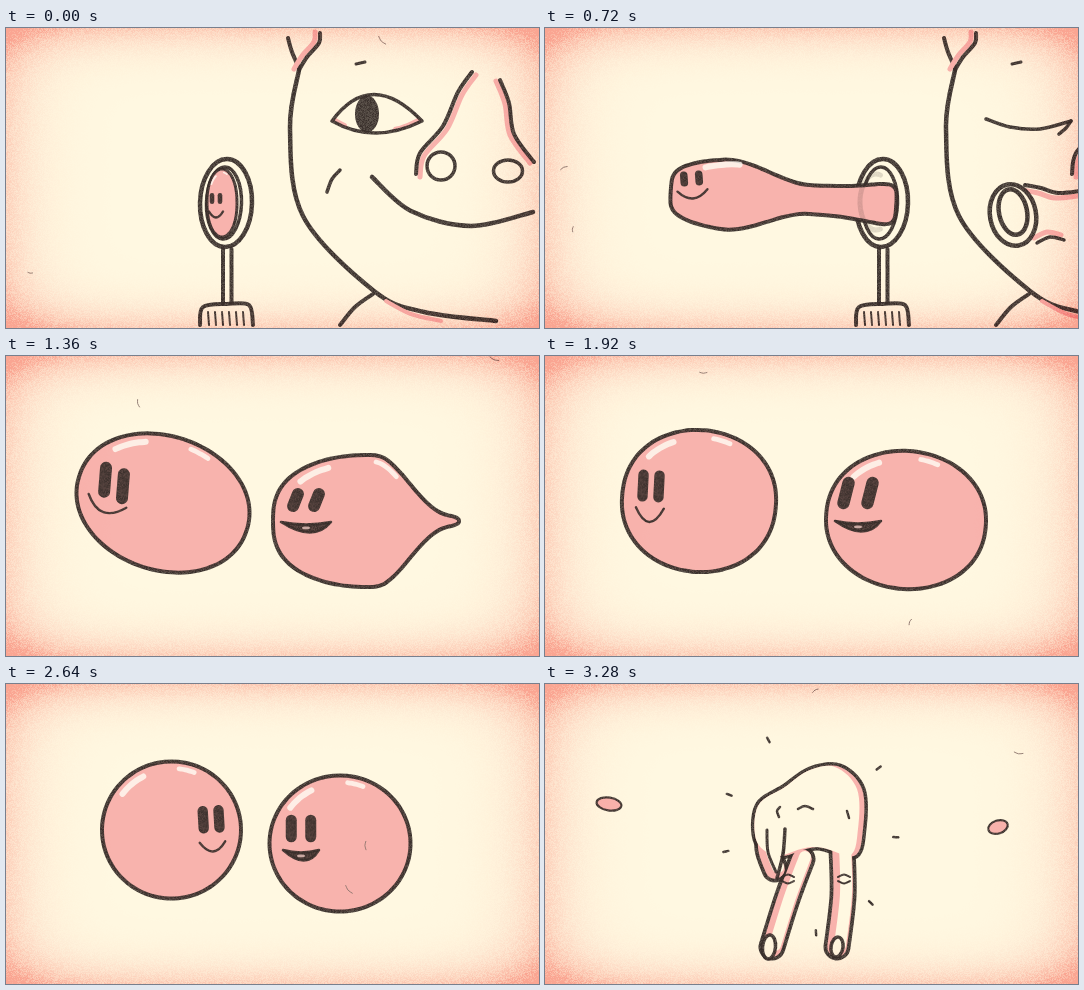
An HTML page with a canvas that plays this animation: 533x300 px, repeating every 3.36 s.

```html
<!DOCTYPE html>
<html lang="en">
<head>
<meta charset="utf-8">
<title>Bubbles</title>
<style>
  html, body { margin: 0; width: 100%; height: 100%; overflow: hidden; background: #fff8e1; }
  canvas { position: fixed; left: 0; top: 0; width: 100vw; height: 100vh; display: block; }
  #paper { mix-blend-mode: multiply; }
</style>
</head>
<body>
<canvas id="art" width="533" height="300"></canvas>
<canvas id="paper" width="533" height="300"></canvas>
<script>
const W = 533, H = 300, LOOP = 3360, STEP = 80;
const CREAM = '#fff8e1', PINK = '#f8b3ad', WHITE = '#fffdf4';
const c = document.getElementById('art').getContext('2d');

function random(seed) {
  return () => {
    seed = (seed * 1664525 + 1013904223) >>> 0;
    return seed / 4294967296;
  };
}

function paintPixels(ctx, w, h, pixel) {
  const img = ctx.createImageData(w, h);
  for (let y = 0, i = 0; y < h; y++)
    for (let x = 0; x < w; x++, i += 4) img.data.set(pixel(x, y), i);
  ctx.putImageData(img, 0, 0);
}

// Grainy crayon for all outlines
function makeInk() {
  const tile = document.createElement('canvas'), rnd = random(3);
  tile.width = tile.height = 96;
  paintPixels(tile.getContext('2d'), 96, 96, () => [56, 46, 42, 205 + 50 * rnd()]);
  return c.createPattern(tile, 'repeat');
}
const INK = makeInk();

// Pink sprayed edges over the whole stage
function paintPaper() {
  const rnd = random(7);
  paintPixels(document.getElementById('paper').getContext('2d'), W, H, (x, y) => {
    const u = Math.abs(x / W * 2 - 1), v = Math.abs(y / H * 2 - 1);
    const a = .42 * u ** 9 + .5 * v ** 8 + .5 * (u * v) ** 5;
    return [250, 170, 165, Math.min(1, a * (.7 + .6 * rnd())) * 255];
  });
}

const clamp = v => Math.max(0, Math.min(1, v));
const smooth = (a, b, v) => {
  v = clamp((v - a) / (b - a));
  return v * v * (3 - 2 * v);
};

// Smooth curve through a flat list of points
function trace(p, closed) {
  const n = p.length / 2;
  const pt = i => {
    i = closed ? (i + n) % n : Math.max(0, Math.min(n - 1, i));
    return [p[i * 2], p[i * 2 + 1]];
  };
  c.beginPath();
  c.moveTo(p[0], p[1]);
  for (let i = 0; i < (closed ? n : n - 1); i++) {
    const [a, b, d, e] = [pt(i - 1), pt(i), pt(i + 1), pt(i + 2)];
    c.bezierCurveTo(b[0] + (d[0] - a[0]) / 6, b[1] + (d[1] - a[1]) / 6,
      d[0] - (e[0] - b[0]) / 6, d[1] - (e[1] - b[1]) / 6, d[0], d[1]);
  }
  if (closed) c.closePath();
}
function ink(width = 4, color = INK) {
  c.lineWidth = width;
  c.strokeStyle = color;
  c.stroke();
}
function tint(color) {
  c.fillStyle = color;
  c.fill();
}
function line(p, width, color) {
  trace(p);
  ink(width, color);
}
function oval(x, y, rx, ry, rot, fill, width) {
  c.beginPath();
  c.ellipse(x, y, rx, ry, rot, 0, Math.PI * 2);
  if (fill) tint(fill);
  if (width) ink(width);
}
function at(x, y, turn, paint, size = 1) {
  c.save();
  c.translate(x, y);
  c.rotate(turn);
  c.scale(size, size);
  paint();
  c.restore();
}
// Line with a pink shadow on one side
function shaded(p, dx, dy, width = 4) {
  line(p.map((v, i) => v + (i % 2 ? dy : dx)), 5, PINK);
  line(p, width);
}

// Pose of a track of [time, pose] at t
function pose(track, t) {
  let i = 0;
  while (i < track.length - 2 && t >= track[i + 1][0]) i++;
  const [t0, a] = track[i], [t1, b] = track[i + 1], f = smooth(t0, t1, t), out = {};
  for (const k in a) out[k] = a[k] + (b[k] - a[k]) * f;
  return out;
}

// Bubble film: an ellipse that can be boxed, pinched to a neck, flared and notched
const body = (x, y, rx, ry, more) =>
  ({ x, y, rx, ry, tilt: 0, box: 1, pinch: 0, from: .5, flare: 0, notch: 0, ...more });
const disc = x => body(x, 175, 15, 34, { box: .9, from: .25 });
const blown = x => body(x, 170, 113, 38,
  { tilt: .06, box: .5, pinch: .63, from: .22, flare: .65 });
const tailed = (x, y, rx, ry) => body(x, y, rx, ry, { box: .75, pinch: .85, from: .55 });

function rim(b, a, scale = 1) {
  const u = Math.cos(a), v = Math.sin(a), p = (1 + u) / 2;
  const w = 1 - b.pinch * smooth(b.from, b.from + .4, p) + b.flare * p ** 8
    - b.notch * Math.exp(-(((p - .46) / .09) ** 2));
  const x = b.rx * u * scale, y = b.ry * w * Math.sign(v) * Math.abs(v) ** b.box * scale;
  const cos = Math.cos(b.tilt), sin = Math.sin(b.tilt);
  return [b.x + x * cos - y * sin, b.y + x * sin + y * cos];
}
function arc(b, from, to, scale, n = 6) {
  return Array.from({ length: n }, (_, i) => rim(b, from + (to - from) * i / (n - 1), scale)).flat();
}
function bubble(b) {
  trace(arc(b, 0, Math.PI * 2 * 63 / 64, 1, 64), true);
  tint(PINK);
  ink(b.rx < 30 ? 3 : 4);
  const w = Math.min(6, b.rx / 8);
  c.globalAlpha = .8;
  line(arc(b, -2.5, -2.05, .88), w, WHITE);
  if (!b.flare) line(arc(b, -1.45, -1.2, .9), w * .8, WHITE);
  c.globalAlpha = 1;
}

// Face: eyes around x, y; the mouth hangs below
const face = (x, y, gap, rx, ry, drop, wide, deep, more) =>
  ({ x, y, gap, rx, ry, drop, wide, deep, turn: 0, lean: 0, bow: 0, ...more });
const tiny = x => face(x, 170.5, 8, 2.3, 5.5, 13, 7, 6);
const puffed = x => face(x, 150.5, 15, 3.8, 7.5, 12, 15, 8, { turn: -.08 });

function drawFace(f, open) {
  at(f.x, f.y, f.turn, () => {
    for (const side of [-.5, .5]) at(side * f.gap, 0, f.lean, () => {
      const h = f.ry - f.rx;
      line([0, -h, f.bow, 0, 0, h], f.rx * 2);
    });
    c.beginPath();
    c.moveTo(-f.wide, f.drop);
    c.quadraticCurveTo(0, f.drop + (open ? 5 : f.deep * 2), f.wide, f.drop);
    if (!open) return ink(2.4);
    c.quadraticCurveTo(f.wide * .3, f.drop + f.deep * 3, -f.wide, f.drop);
    tint(INK);
    ink(2.5);
    oval(0, f.drop + f.deep * .85, 4, 1.4, 0, '#c9a9a2');
  });
}

const pan = t => 117 * (t / 720) ** 2;

const left = {
  body: [
    [0, disc(216)],
    [240, disc(216 + pan(240))],
    [720, blown(238.5)],
    [960, tailed(175, 158, 96, 58)],
    [1360, body(157, 147, 88, 67, { tilt: .32, box: .95 })],
    [1920, body(154, 145, 77, 71, { box: .9, tilt: .1 })],
    [2320, body(153, 146, 76, 70)],
    [2520, body(153, 146, 75, 71)],
    [2760, body(178, 146, 64, 66)]
  ],
  face: [
    [0, tiny(210)],
    [240, tiny(210 + pan(240))],
    [720, puffed(146.5)],
    [1360, face(108, 127, 19, 6, 18, 19, 20, 12, { turn: .35, lean: -.27 })],
    [1920, face(106, 130, 16, 5.2, 16, 22, 14, 14, { turn: .05 })],
    [2160, face(106, 136, 17, 5.5, 18, 24, 14, 12, { turn: -.1 })],
    [2320, face(130, 184, 18, 6, 30, 40, 9, 8, { turn: -1.05, bow: -5 })],
    [2480, face(196, 142, 17, 5.5, 15, 24, 14, 10, { turn: -.15 })],
    [2760, face(211, 131, 15, 5, 13, 22, 12, 9)]
  ]
};
const right = {
  body: [
    [880, disc(216 + pan(880))],
    [1120, blown(121.5 + pan(1120))],
    [1360, tailed(360, 165, 93, 66)],
    [1600, body(358, 165, 76, 69)],
    [1920, body(361, 164, 80, 69, { box: .92, tilt: .1 })],
    [2320, body(360, 162, 74, 73)],
    [2520, body(360, 162, 73, 72)],
    [2760, body(308, 157, 68, 64)]
  ],
  face: [
    [880, tiny(210 + pan(880))],
    [1120, puffed(29.5 + pan(1120))],
    [1360, face(300, 144, 21, 6, 12.5, 22, 25, 7, { lean: .38 })],
    [1920, face(313, 137, 24, 6.2, 16.5, 28, 23, 7, { lean: .25 })],
    [2320, face(319.5, 150, 21, 6, 14.5, 21, 20, 7)],
    [2520, face(318, 150, 21, 6, 14.5, 21, 20, 7)],
    [2760, face(272, 139, 18, 5, 13, 22, 16, 7)]
  ]
};
const joined = [
  [2760, body(244, 152, 132, 65, { tilt: .08, box: .6, notch: .42 })],
  [2960, body(250, 150, 132, 63, { tilt: .09, box: .56, notch: .06 })],
  [3160, body(264, 150, 80, 82)]
];

function wand() {
  oval(220, 175, 26, 44, .03, CREAM, 4.5);
  oval(218, 175, 17.5, 36, .03, null, 3.5);
  for (const x of [217, 225.5]) line([x, 221, x, 275]);
  line([194, 297, 197, 279, 221, 276, 243, 277, 247, 297]);
  for (let x = 202; x < 244; x += 7) line([x, 284, x + 1, 297], 2);
}

function openEye() {
  c.beginPath();
  c.moveTo(326, 93);
  c.quadraticCurveTo(365, 40, 416, 93);
  c.quadraticCurveTo(368, 117, 326, 93);
  c.save();
  c.clip();
  line([326, 93, 344, 102, 368, 105, 395, 102, 416, 93], 9, PINK);
  oval(365, 88, 26, 24, 0, CREAM);
  c.restore();
  c.beginPath();
  c.moveTo(326, 93);
  c.quadraticCurveTo(365, 40, 416, 93);
  c.quadraticCurveTo(368, 117, 326, 93);
  ink(3.5);
  oval(361, 86, 12, 18.5, 0, INK);
}

function pucker() {
  shaded([12, -30, 28, -27, 45, -22, 68, -24], -3, 5);
  shaded([24, 28, 37, 22, 51, 25], -3, -5, 3.5);
  oval(0, 0, 23, 31, -.18, CREAM, 4.5);
  oval(0, -3, 14, 23, -.2, CREAM, 4.5);
}

function person(t) {
  // Ear, cheek, chin, neck
  line([282, 10, 286, 24, 293, 40]);
  shaded([314, 5, 313, 15, 301, 29, 293, 42], -5, -1);
  line([293, 42, 284, 100, 297, 188, 368, 263, 418, 284, 490, 293], 4.5);
  line([380, 273, 405, 286, 435, 293], 4, PINK);
  line([367, 266, 349, 279, 334, 297]);
  line([350, 36, 359, 34], 3);

  // Nose
  shaded([466, 44, 452, 64, 437, 98, 414, 125, 410, 146], 4, 3);
  shaded([494, 52, 503, 75, 508, 106, 528, 134], -4, 1);
  oval(435, 138, 14, 14, 0, CREAM, 3.5);
  oval(502, 143, 14.5, 11, 0, CREAM, 3.5);

  if (t < 240) {
    openEye();
    line([334, 142, 326, 151, 321, 164], 3.5);
  } else {
    line([324, 91, 348, 99, 378, 101, 409, 93], 3.5);
    line([409, 93, 404, 100, 397, 106], 3.5);
  }
  if (t < 160) line([366, 149, 405, 183, 465, 198, 527, 184], 4.5);
  else at(351, 187, 0, pucker, .55 + .45 * smooth(160, 480, t));
}

// Ring glimpsed through the film while it is being blown
function ghostRing(t) {
  c.globalAlpha = .17;
  c.beginPath();
  c.ellipse(pan(t) + 214, 174, 16, 28, 0, 1.3, 5);
  ink(5);
  c.globalAlpha = 1;
}

function drawBubble(who, t, open) {
  bubble(pose(who.body, t));
  drawFace(pose(who.face, t), open);
}

function merged(t) {
  bubble(pose(joined, t));
  if (t > 3040) return;
  const melt = smooth(2760, 2960, t), w = 5 - 3 * melt;
  line([238, 84, 243, 92, 241, 102], 2.5);
  line([244, 184, 240, 195, 247, 203], 2.5);
  line([241, 104, 239, 145, 242, 184], 2.5 - 2 * melt);
  line([219, 163, 231, 168, 245, 168], 2);
  line([252, 166, 265, 165, 278, 158], 2);
  line([247, 142, 252, 141, 259, 137], w);
  line([233, 141, 241, 143], w * .7);
}

// Palm and fingers share one outline: ink first, then the filling
function hand() {
  const palm = [213, 122, 240, 103, 265, 86, 295, 83, 317, 105, 318, 145, 309, 172,
    272, 163, 235, 172, 212, 158];
  const fingers = [
    [223, 140, 223, 165, 230, 185],
    [257, 175, 242, 215, 227, 263],
    [297, 165, 298, 212, 292, 263]
  ];
  trace(palm, true);
  ink(7);
  for (const f of fingers) line(f, 27);
  for (const f of fingers) line(f, 19.5, PINK);
  trace(palm, true);
  tint(PINK);
  for (const f of fingers) line(f.map((v, i) => i % 2 ? v - 2 : v + 3), 12, CREAM);
  c.save();
  trace(palm, true);
  c.clip();
  c.translate(-5, 0);
  trace(palm, true);
  tint(CREAM);
  c.restore();

  line([222, 146, 223, 168, 231, 188], 3);
  line([240, 145, 238, 170, 232, 194], 3.5);
  oval(224, 263, 6.5, 12, .1, CREAM, 3.5);
  oval(292, 263, 6, 10, .15, CREAM, 3.5);
  for (const x of [237, 293]) for (const s of [-1, 1])
    line([x, 195 + s * 2, x + 6, 195 + s * 4.5, x + 12, 195 + s * 2], 2);
  line([235, 123, 232, 127, 234, 133], 2.5);
  line([253, 125, 260, 122, 268, 125], 2.5);
  line([302, 127, 304, 134], 2.5);
}

function popped(t) {
  const out = t < 3280 ? .62 : 1;
  at(0, out < 1 ? -10 : 0, 0, hand);
  for (let k = 0; k < 9; k++) {
    if (k % 5 === 2) continue;
    const a = (41 * k - 160) * Math.PI / 180, u = Math.cos(a), v = Math.sin(a);
    const x = 265 + 86 * u * out, y = 146 + 103 * v * out;
    line([x - 2.5 * u, y - 2.5 * v, x + 2.5 * u, y + 2.5 * v], 2.5);
  }
  oval(265 - 201 * out, 120, 12.5, 6.5, .15, PINK, 2.2);
  oval(265 + 188 * out, 143, 10, 6.5, -.3, PINK, 2.2);
}

function dust(t) {
  const rnd = random(t + 31);
  rnd();
  for (let k = 0; k < 2; k++) {
    const len = 2 + rnd() * 4;
    at(rnd() * W, rnd() * H, rnd() * 3, () => line([-len, 0, 0, len / 4, len, 0], .8, '#857068'));
  }
}

function draw(t) {
  c.fillStyle = CREAM;
  c.fillRect(0, 0, W, H);
  c.lineCap = c.lineJoin = 'round';
  if (t < 1280) at(pan(t), 0, 0, () => { person(t); wand(); });
  if (t < 2760) {
    drawBubble(left, t);
    if (t >= 880) drawBubble(right, t, t >= 1280);
    if (t >= 400 && t < 800 || t >= 960 && t < 1200) ghostRing(t);
  } else if (t < 3200) merged(t);
  else popped(t);
  dust(t);
}

paintPaper();
const start = performance.now();
let shown = -1;
function tick() {
  const t = Math.floor((performance.now() - start) % LOOP / STEP) * STEP;
  if (t !== shown) draw(shown = t);
  requestAnimationFrame(tick);
}
tick();
</script>
</body>
</html>
```
